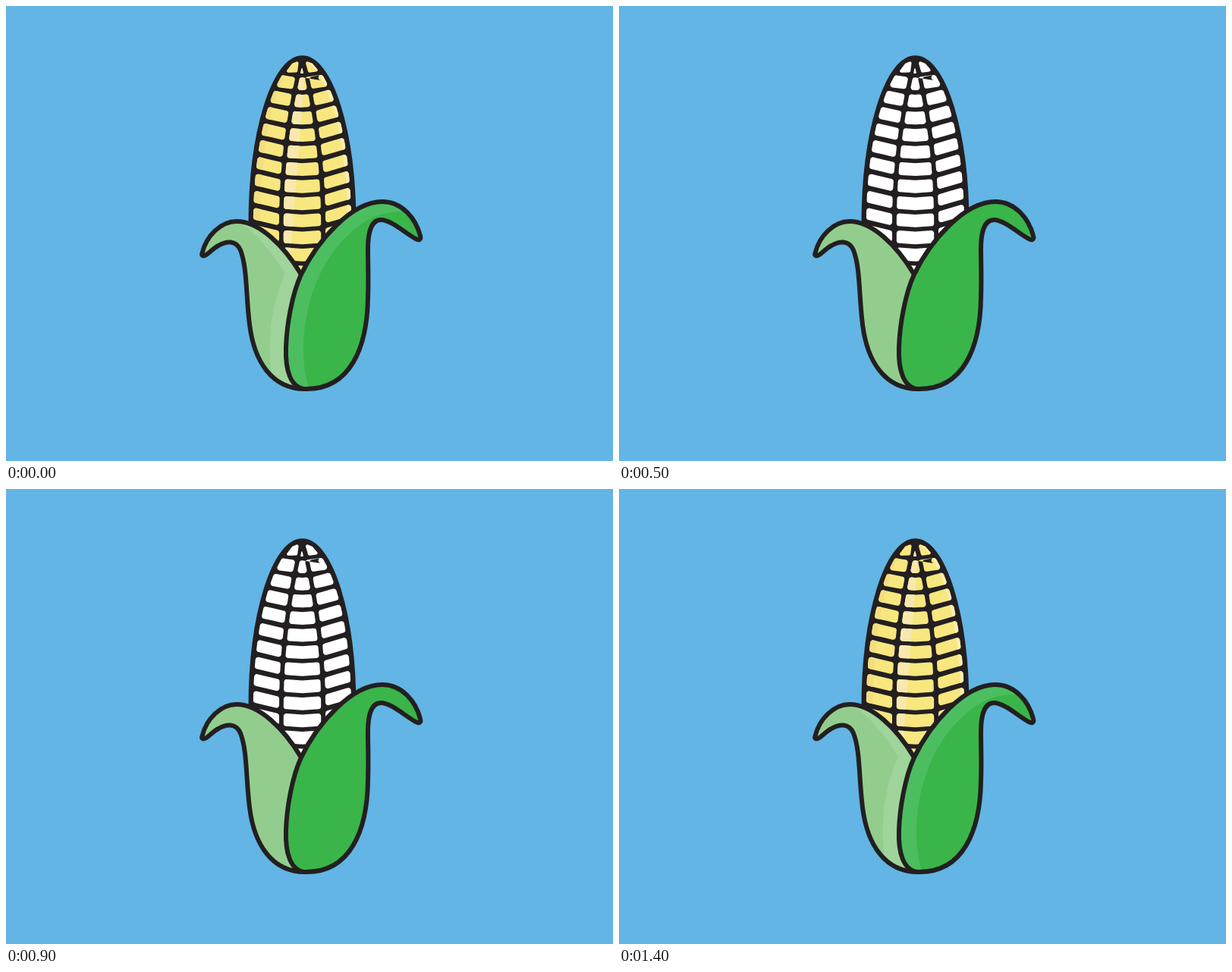
An HTML page with a canvas for the animation above (1500 ms loop, 800x600 px).

```html
<!DOCTYPE html>
<html lang="en">
<head>
<meta charset="utf-8">
<title>Corn</title>
<style>
html, body { margin: 0; width: 100%; height: 100%; overflow: hidden; background: #62b5e5; }
canvas { display: block; }
</style>
</head>
<body>
<canvas id="stage" width="800" height="600"></canvas>
<script>
const ctx = document.getElementById('stage').getContext('2d');
const INK = '#231f20';
const MID = 390.5, TOP = 68.3, BASE = 288;

// Half widths of the whole cob and of its middle column at height y
const rise = y => Math.min(1, Math.max(0, (BASE - y) / (BASE - TOP)));
const cobHalf = y => 68 * Math.sqrt(1 - rise(y) ** 2);
const midHalf = y => 27.5 * (1 - rise(y) ** 2);

function addRounded(path, points, radius) {
  const last = points[points.length - 1];
  path.moveTo((last[0] + points[0][0]) / 2, (last[1] + points[0][1]) / 2);
  points.forEach((p, i) => path.arcTo(...p, ...points[(i + 1) % points.length], radius));
  path.closePath();
}

// A kernel between two edge functions, with its centre height at either side
function addKernel(path, left, right, yLeft, yRight, half, sag = 0) {
  const side = offset => {
    const a = [left(yLeft + offset), yLeft + offset];
    const b = [right(yRight + offset), yRight + offset];
    return [a, [(a[0] + b[0]) / 2, (a[1] + b[1]) / 2 + sag], b];
  };
  addRounded(path, [...side(-half), ...side(half).reverse()], 3.6);
}

const edges = {
  outerLeft: y => MID - cobHalf(y) + 3.3,
  innerLeft: y => MID - midHalf(y) - 3,
  midLeft: y => MID - midHalf(y) + 2.8,
  midRight: y => MID + midHalf(y) - 2.8,
  innerRight: y => MID + midHalf(y) + 3,
  outerRight: y => MID + cobHalf(y) - 3.4
};

function buildKernels() {
  const path = new Path2D();
  addRounded(path, [[368, 88], [377, 76], [386, 72], [384, 87.5]], 2);
  addRounded(path, [[394, 72], [404, 76], [412.5, 86], [398.5, 88]], 2);
  addRounded(path, [[390, 79], [392, 89], [388, 89]], 0.8);
  for (let row = 1; row <= 12; row++) {
    const y = 80 + 22.5 * row;
    const sag = midHalf(y) * 0.06;
    addKernel(path, edges.midLeft, edges.midRight, y - sag / 2, y - sag / 2, 8.4, sag);
    if (row > 11) continue;
    const leftDrop = (edges.innerLeft(y) - edges.outerLeft(y) - 16) * 0.45;
    const rightDrop = (edges.outerRight(y) - edges.innerRight(y) - 16) * 0.55;
    const yLeft = y - 0.8, yRight = y - 0.6 - 0.36 * row;
    addKernel(path, edges.outerLeft, edges.innerLeft, yLeft - leftDrop, yLeft, 7.9);
    addKernel(path, edges.innerRight, edges.outerRight, yRight, yRight - rightDrop, 7.7);
  }
  return path;
}

// A vertical strip between two edge functions
function strip(left, right) {
  const path = new Path2D();
  for (let y = 66; y <= 366; y += 4) path.lineTo(left(y), y);
  for (let y = 366; y >= 66; y -= 4) path.lineTo(right(y), y);
  return path;
}

const kernels = buildKernels();
const cob = new Path2D('M322.5 288A68 219.7 0 0 1 458.5 288L391 360Z');
const midShine = strip(y => MID - midHalf(y), y => Math.min(393 - (y - 100) * 0.08, MID + midHalf(y)));
const rightShine = strip(y => edges.outerRight(y) - 4.5, y => 470);
const leftShade = strip(y => 310, y => edges.outerLeft(y) + cobHalf(y) * 0.13);

const leftLeaf = new Path2D(`M258.5 326C264 303 283 284 304 284C333 284 366 315 389 354
  L396 505C350 506 327 468 321 420C316 380 318 345 309 322C303 308 290 310 280 316
  C272 320 266 328 262 329C259 330 257.5 329 258.5 326Z`);
const rightLeaf = new Path2D(`M396 505C374 505 368 478 369 450C370 420 377 380 389 354
  C410 310 455 258 496 258C522 258 540 280 546 303C547.5 308 544 309.5 540 307
  C528 301 508 282 494 282C480 282 477 303 477 320C477 340 478 360 477 385
  C476 450 454 505 396 505Z`);
const leftLeafShine = new Path2D(`M298 280C325 293 350 323 366 350Q368 353 366 357
  C350 396 342 445 352 500L400 510V340L320 276Z`);
const rightLeafShine = new Path2D(`M400 508C380 445 398 352 449 304
  C472 281 496 268 530 272L500 250L440 270L360 380V508Z`);

function fillClipped(shape, base, overlays) {
  ctx.save();
  ctx.clip(shape);
  ctx.fillStyle = base;
  ctx.fillRect(0, 0, 800, 600);
  for (const [on, path, color] of overlays) {
    if (!on) continue;
    ctx.fillStyle = color;
    ctx.fill(path);
  }
  ctx.restore();
}

function drawLeaf(shape, color, shine, shineColor, level, start) {
  fillClipped(shape, level >= start ? color : '#fff', [[level >= 7, shine, shineColor]]);
  ctx.stroke(shape);
}

// Level 0 is bare line art; each level adds one layer of colour
function draw(level) {
  ctx.setTransform(1, 0, 0, 1, 0, 0);
  ctx.fillStyle = '#62b5e5';
  ctx.fillRect(0, 0, 800, 600);
  if (level < 2) ctx.setTransform(1.003, 0, 0, 1.003, -0.6, -0.2);
  else if (level === 3) ctx.translate(-0.8, 0);
  else if (level === 5) ctx.translate(0, 0.8);

  ctx.strokeStyle = ctx.fillStyle = INK;
  ctx.lineWidth = 6;
  ctx.lineJoin = 'round';
  ctx.fill(cob);
  ctx.stroke(cob);
  fillClipped(kernels, level >= 3 ? '#f8e77f' : '#fff', [
    [level >= 4, midShine, '#f7e9ae'],
    [level >= 5, rightShine, '#faeeb4'],
    [level >= 6, leftShade, '#f2dd80']
  ]);
  drawLeaf(leftLeaf, '#93cd8d', leftLeafShine, '#9fd49a', level, 1);
  drawLeaf(rightLeaf, '#3ab54a', rightLeafShine, '#4cbe60', level, 2);
}

function tick() {
  const step = Math.floor(performance.now() % 1500 / 100);
  draw(Math.abs(step - 7));
  requestAnimationFrame(tick);
}
tick();
</script>
</body>
</html>
```
